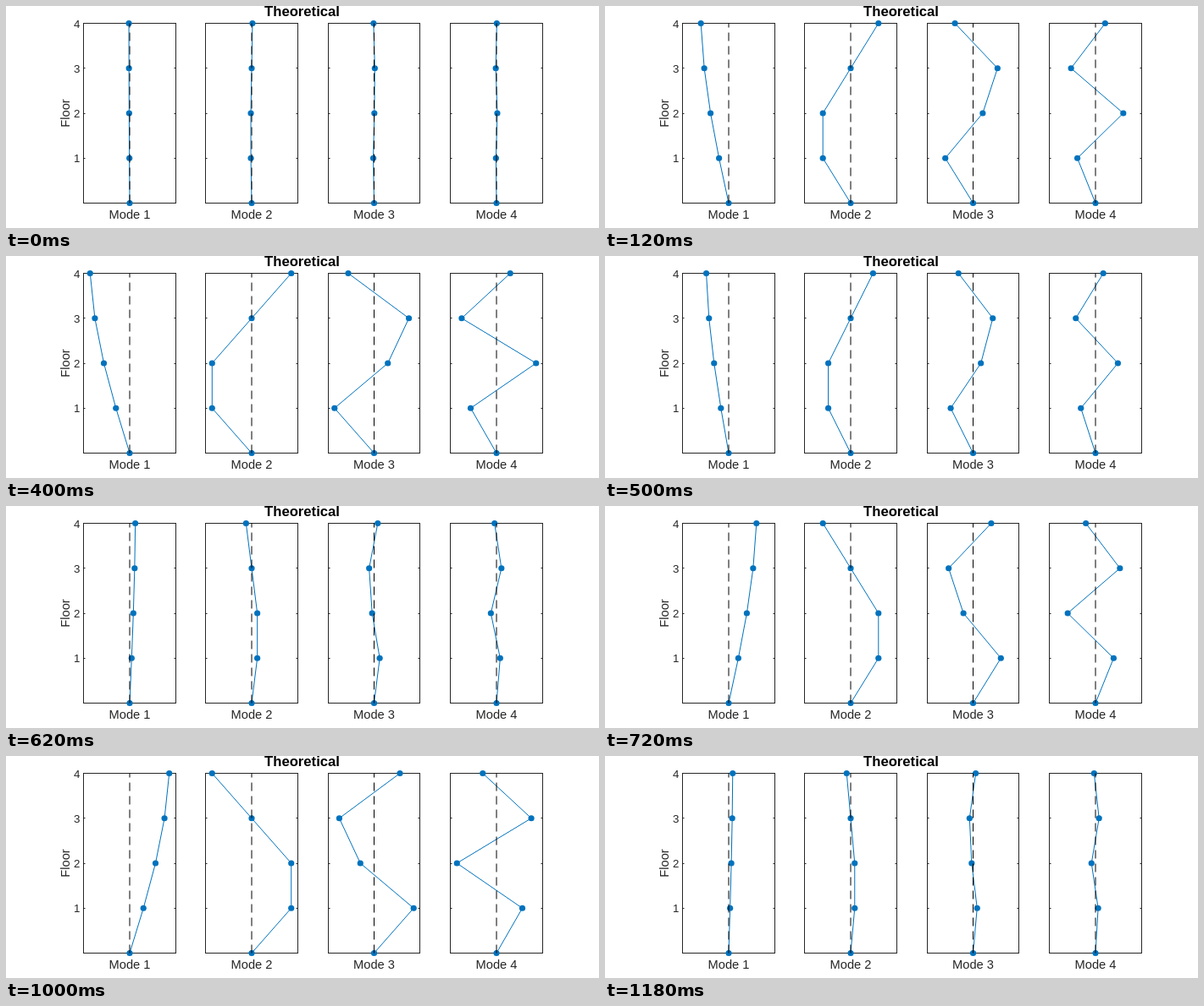
These frames come from a looping animation (700x263 px, 1200 ms). An HTML page with a canvas:

```html
<!DOCTYPE html>
<html lang="en">
<head>
<meta charset="utf-8">
<title>Theoretical mode shapes</title>
<style>
  html, body { margin: 0; width: 100%; height: 100%; overflow: hidden; background: #fff; }
  canvas { display: block; }
</style>
</head>
<body>
<canvas id="stage" width="700" height="263"></canvas>
<script>
const ctx = document.getElementById('stage').getContext('2d');

const STEP_MS = 20, STEPS = 60;
const FLOORS = 4, TOP = 20.5, BOTTOM = 233.5;
const AMPLITUDE = 54.5, MARKER_RADIUS = 3.6;
const BLUE = '#0072bd', INK = '#262626';
const FONT = '"Liberation Sans", Arial, sans-serif';
const PANELS = [[91.5, 200.5], [235.5, 344.5], [380.5, 488.5], [524.5, 633.5]];

const rad = deg => deg * Math.PI / 180;
const floorY = floor => BOTTOM - (BOTTOM - TOP) * floor / FLOORS;

// Uniform shear building fixed at its base, scaled to a peak of one.
function modeShape(mode) {
  const shape = Array.from({ length: FLOORS + 1 },
    (_, floor) => Math.sin(rad(20 * (2 * mode - 1) * floor)));
  const peak = Math.max(...shape.map(Math.abs));
  return shape.map(v => v / peak);
}
const SHAPES = PANELS.map((_, i) => modeShape(i + 1));

function text(str, x, y, size, align = 'center', color = INK, weight = '') {
  ctx.font = `${weight} ${size}px ${FONT}`;
  ctx.textAlign = align;
  ctx.fillStyle = color;
  ctx.fillText(str, x, y);
}

function line(points, color, dash = []) {
  ctx.setLineDash(dash);
  ctx.strokeStyle = color;
  ctx.beginPath();
  points.forEach(([x, y]) => ctx.lineTo(x, y));
  ctx.stroke();
  ctx.setLineDash([]);
}

function drawAxes(left, right, label) {
  ctx.strokeStyle = INK;
  ctx.strokeRect(left, TOP, right - left, BOTTOM - TOP);
  for (let floor = 1; floor < FLOORS; floor++) {
    const y = Math.floor(floorY(floor)) + 0.5;
    line([[left, y], [left + 2, y]], INK);
    line([[right, y], [right - 2, y]], INK);
  }
  text(label, (left + right) / 2, 252, 14.67);
}

function drawMode(center, shape, swing) {
  const points = shape.map((v, floor) => [center - AMPLITUDE * swing * v, floorY(floor)]);
  line(points, BLUE);
  ctx.fillStyle = BLUE;
  for (const [x, y] of points) {
    ctx.beginPath();
    ctx.arc(x, y, MARKER_RADIUS, 0, 2 * Math.PI);
    ctx.fill();
  }
  line([[center, BOTTOM], [center, TOP]], '#000', [10, 6]);
}

function drawLabels() {
  text('Theoretical', 349.5, 12, 16.67, 'center', '#000', 'bold');
  for (let floor = 1; floor <= FLOORS; floor++) {
    text(floor, 87.5, floorY(floor) + 5, 13.33, 'right');
  }
  ctx.save();
  ctx.translate(75, 127);
  ctx.rotate(-Math.PI / 2);
  text('Floor', 0, 0, 14.67);
  ctx.restore();
}

function draw(now) {
  const step = Math.floor(now / STEP_MS) % STEPS;
  const swing = Math.sin(rad(360 * step / STEPS + 1));
  ctx.fillStyle = '#fff';
  ctx.fillRect(0, 0, 700, 263);
  ctx.lineWidth = 1;
  drawLabels();
  PANELS.forEach(([left, right], i) => {
    drawAxes(left, right, `Mode ${i + 1}`);
    drawMode((left + right) / 2, SHAPES[i], swing);
  });
}

let start;
function tick(now) {
  start ??= now;
  draw(now - start);
  requestAnimationFrame(tick);
}
draw(0);
requestAnimationFrame(tick);
</script>
</body>
</html>
```
